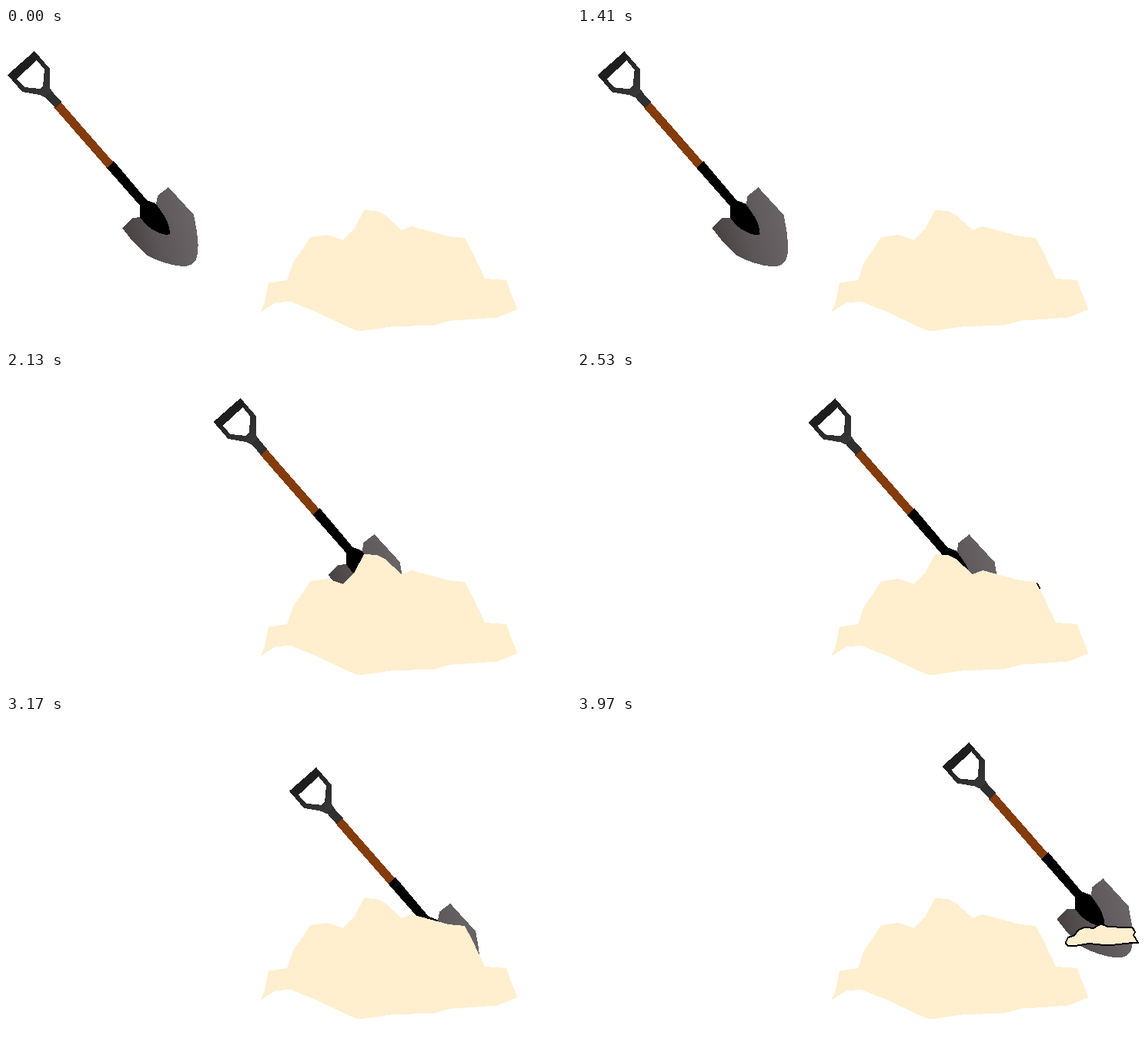
Animation of 734 by 411 pixels, one loop 4.01 s. Source, as an HTML page:

```html
<!DOCTYPE html>
<html lang="en">
<head>
<meta charset="utf-8">
<title>Shovel and sand</title>
<style>
  html, body { margin: 0; width: 100%; height: 100%; overflow: hidden; background: #fff; }
  svg { display: block; width: 734px; height: 411px; shape-rendering: crispEdges; }
</style>
</head>
<body>
<svg viewBox="0 0 734 411">
  <defs>
    <linearGradient id="steel" gradientUnits="userSpaceOnUse" x1="160" y1="270" x2="240" y2="250">
      <stop offset="0" stop-color="#4a4445"/>
      <stop offset=".45" stop-color="#5c5658"/>
      <stop offset="1" stop-color="#686365"/>
    </linearGradient>
    <linearGradient id="grip" gradientUnits="userSpaceOnUse" x1="15" y1="40" x2="60" y2="90">
      <stop offset="0" stop-color="#1c1c1c"/>
      <stop offset="1" stop-color="#3c3b3b"/>
    </linearGradient>
  </defs>

  <g id="shovel">
    <path fill="url(#steel)" d="M211 207 L244 243 L248 265 L249.500 281 Q250 300 244 305
      Q239 310 229 310 Q206 308 182 295 L165 278 L151 260 L164 247 L176 246 L195 229 L197 218 Z"/>
    <path d="M140 173 L130 181 L174 231 L174 246 L182 256 Q195 267 208 269 L213 268
      Q213 257 206 245 Q199 234 194 228 L183 224 Z"/>
    <path fill="#843c0c" d="M70 95 L62 103 L131 182 L139 174 Z"/>
    <path fill="url(#grip)" fill-rule="evenodd" d="M37 30 L57 53 L57 78 L62 85 L50 90 L44 87 L21 83 L2 61 Z
      M40 42 L14 66 L24 77 L44 79 L48 75 L50 54 Z"/>
    <path fill="#1e1e1e" d="M37 30 L43 38 L9 69 L2 61 Z"/>
    <path fill="#303030" d="M59 82 L72 96 L64 104 L50 89 Z"/>
  </g>

  <path id="scoop" fill="#ffefcf" stroke="#000" stroke-width="2" stroke-linejoin="round"
    d="M634.500 295 L638 288 L646 285.500 L651 278.500 L660 274.500 L671 276 L680 270.500 L690 274 L722 275.500
    L725 281 L723 285 L726 290 L729 295 L722 295 L690 298.500 L665 296 L650 298.500 L638 299 Z"/>

  <path fill="#ffefcf" d="M330 370 L336 357 L341 331.500 L365 328 L373 305 L395.500 272 L418 269 L438 276
    L453 260 L465 237 L482 238 L492 243 L514 263 L527 258 L575 271 L596 273 L606 292 L622 326
    L650 328 L656 345 L664.500 366 L638 376.500 L590 380 L578 380.500 L555 386.500 L500 388.500 L458 394.500 L440 387
    L405 370 L370 356 L350 357 Z"/>
</svg>
<script>
  const LOOP = 4010, HOLD = 1050, STEP = 40;
  const shovel = document.getElementById('shovel');
  const scoop = document.getElementById('scoop');

  // Constant acceleration to the middle, then constant braking.
  function ease(t, start, length) {
    const u = Math.min(1, Math.max(0, (t - start) / length));
    return u < 0.5 ? 2 * u * u : 1 - 2 * (1 - u) * (1 - u);
  }

  const place = (el, x, y) => el.setAttribute('transform', `translate(${x.toFixed(2)} ${y.toFixed(2)})`);

  function draw(ms) {
    const t = ms < HOLD ? 0 : HOLD + Math.floor((ms - HOLD) / STEP) * STEP;
    const push = ease(t, 1153, 1265);
    const dig = ease(t, 2615, 1260);
    const arc = Math.sin(Math.PI * dig);
    place(shovel, 298.5 * push + 174 * dig, 4.4 * push + 34.5 * arc);

    // The load waits inside the heap until the blade catches up.
    const lead = 51 * (1 - Math.min(1, dig / 0.38));
    place(scoop, 175 * (dig - 1) + lead, 44 * arc);
    scoop.style.display = t < 2415 ? 'none' : '';
  }

  const begin = performance.now();
  function tick() {
    draw((performance.now() - begin) % LOOP);
    requestAnimationFrame(tick);
  }
  tick();
</script>
</body>
</html>
```
